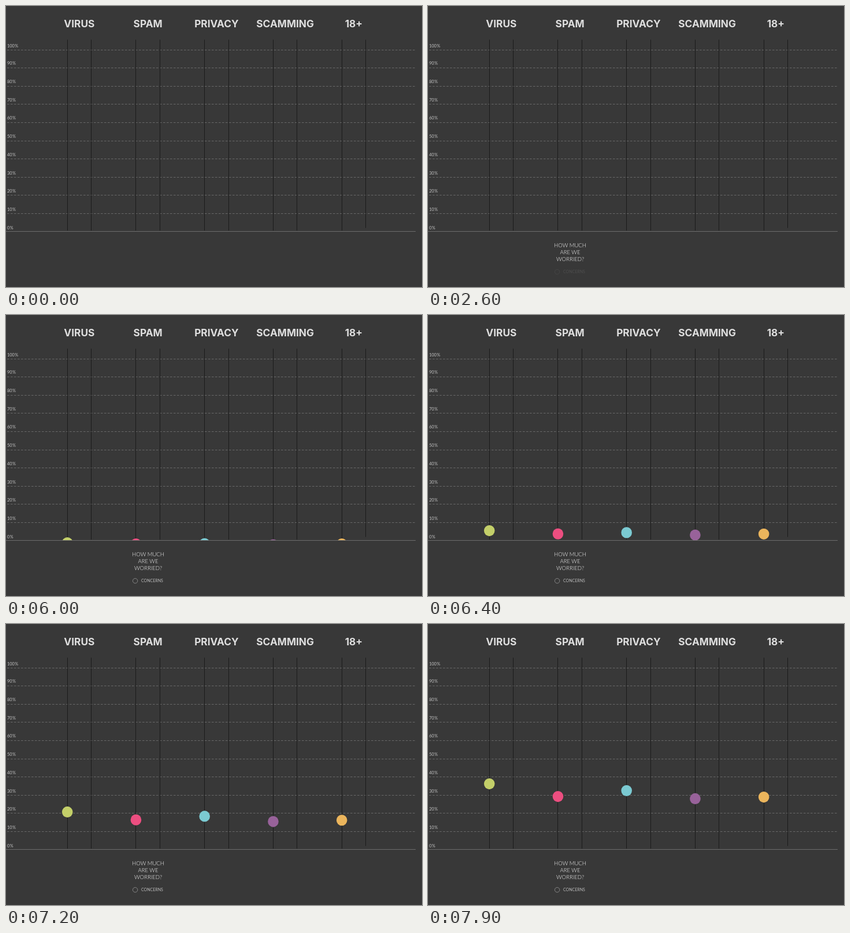
Write an HTML page that moves like this. It is 720 by 488 pixels and loops after 8000 ms.

```html
<!DOCTYPE html>
<html lang="en">
<head>
<meta charset="utf-8">
<title>Online worries</title>
<style>
  html, body { margin: 0; width: 100%; height: 100%; overflow: hidden; background: #383838; }
  svg { display: block; width: 720px; height: 488px; }
  text { font-family: Lato, sans-serif; fill: #dedede; }
  .title { font: 700 17.3px Inter, sans-serif; text-anchor: middle; }
  .label { font-size: 7.4px; fill: #c4c4c4; }
  .question { font-size: 9.5px; font-weight: 300; text-anchor: middle; fill: #fff; }
  .key { font-size: 7px; fill: #bbb; }
  .rail { stroke: #1b1b1b; }
  .grid { stroke: #686868; stroke-dasharray: 3.6 2.4; }
  .base { stroke: #6c6c6c; }
  .ring { fill: none; stroke: #999; stroke-width: .8; }
</style>
</head>
<body>
<svg viewBox="0 0 720 488">
  <clipPath id="above"><rect width="720" height="391"/></clipPath>
  <g id="chart"></g>
  <g id="balls" clip-path="url(#above)"></g>
  <path class="base" d="M0 391.5H709"/>
  <g id="question">
    <text class="question" x="246" y="419.4">HOW MUCH</text>
    <text class="question" x="246" y="431.3">ARE WE</text>
    <text class="question" x="246" y="443.2">WORRIED?</text>
  </g>
  <g id="key">
    <circle class="ring" cx="223.6" cy="461.7" r="4.2"/>
    <text class="key" x="234" y="464.3">CONCERNS</text>
  </g>
</svg>
<script>
const LOOP = 8000, RISE_START = 6000, STEP = 100;
const $ = id => document.getElementById(id);

function add(parent, tag, attrs, text) {
  const el = document.createElementNS('http://www.w3.org/2000/svg', tag);
  for (const name in attrs) el.setAttribute(name, attrs[name]);
  if (text) el.textContent = text;
  return parent.appendChild(el);
}

// start: centre at the first step; rise: distance covered in 19 steps
const columns = [
  { title: 'VIRUS',    color: '#c3cf69', start: 395.5, rise: 118 },
  { title: 'SPAM',     color: '#ec4e80', start: 397.5, rise: 98 },
  { title: 'PRIVACY',  color: '#7bcad2', start: 397,   rise: 107.7 },
  { title: 'SCAMMING', color: '#98629a', start: 399,   rise: 95.6 },
  { title: '18+',      color: '#ebb55c', start: 397.5, rise: 97 }
];

for (let i = 0; i <= 10; i++) {
  if (i) add($('chart'), 'path', { class: 'grid', d: `M2 ${Math.floor(391.9 - 31.57 * i) + .5}H709` });
  const y = i === 10 ? 72.1 : 387.8 - 31.75 * i;
  add($('chart'), 'text', { class: 'label', x: 2, y }, i * 10 + '\u200a%');
}

columns.forEach((col, i) => {
  const x = 106.2 + 118.75 * i;
  add($('chart'), 'text', { class: 'title', x: x + 20.7, y: 36.8 }, col.title);
  add($('chart'), 'path', { class: 'rail', d: `M${Math.floor(x) + .5} 58.5V390` });
  add($('chart'), 'path', { class: 'rail', d: `M${Math.floor(x + 41.3) + .5} 58.5V${i === 4 ? 385.5 : 390}` });
  col.ball = add($('balls'), 'ellipse', { cx: x, rx: 9.3, ry: 9.6, fill: col.color });
});

// Pairs of time and opacity, each held until the next.
const questionFade = [[300, .08], [500, .14], [700, .22], [1000, .35], [1300, .47],
                      [1600, .62], [1900, .78], [2100, .8], [2400, 1]];
const keyFade = [[2600, .16], [2700, .28], [2900, .5], [3100, .75], [3300, .87], [3500, 1]];
const held = (fade, t) => fade.reduce((value, [at, next]) => t >= at ? next : value, 0);

function draw(t) {
  $('question').setAttribute('opacity', held(questionFade, t));
  $('key').setAttribute('opacity', held(keyFade, t));
  $('balls').setAttribute('visibility', t >= RISE_START ? 'visible' : 'hidden');
  const n = Math.max(0, Math.floor((t - RISE_START) / STEP));
  const progress = (4.98 * n + .0646 * n * n) / 118;
  for (const { ball, start, rise } of columns) ball.setAttribute('cy', start - rise * progress);
}

const began = performance.now();
function tick() {
  draw((performance.now() - began) % LOOP);
  requestAnimationFrame(tick);
}
tick();
</script>
</body>
</html>
```
